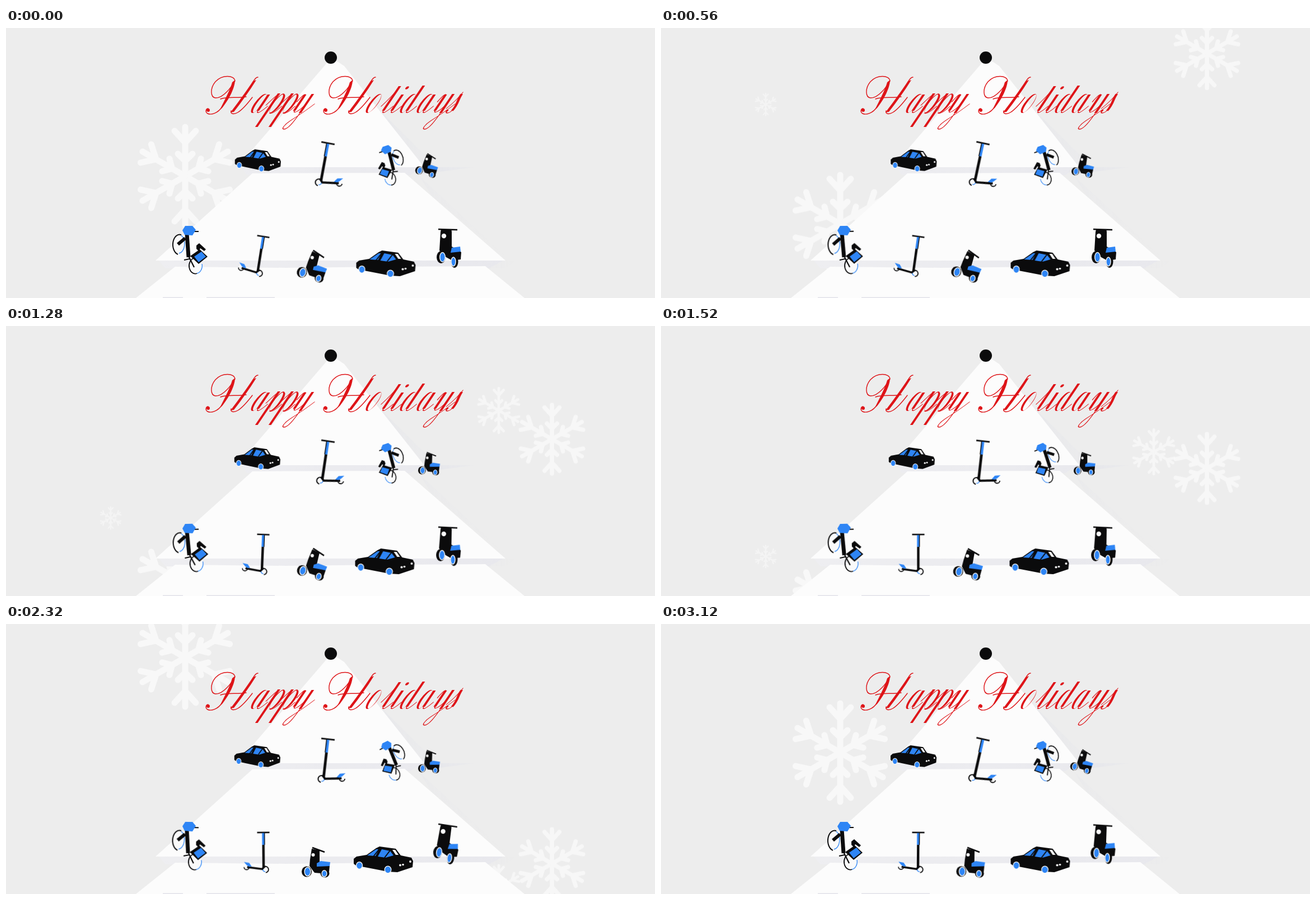
An HTML page for the animation above (3200 ms loop, 1159 by 483 pixels).

```html
<!DOCTYPE html>
<html lang="en">
<head>
<meta charset="utf-8">
<title>Happy Holidays</title>
<style>
  html, body { margin: 0; width: 100%; height: 100%; overflow: hidden; background: #ededed; }
  svg { display: block; width: 100%; height: 100%; }
  .ink { fill: #0b0b0c; }
  .blue { fill: #2e85f5; }
  .pale { fill: #fafafa; }
  .snowy { fill: #fcfcfc; }
  .line { fill: none; stroke: #0b0b0c; }
  .bline { fill: none; stroke: #2e85f5; }
  .hair { fill: none; stroke: #de1418; stroke-width: 1.4; stroke-linecap: round; }
  .stem { fill: none; stroke: #de1418; stroke-width: 4.6; }
  .red { fill: #de1418; }
  .flake { fill: none; stroke: #fafafa; stroke-linecap: round; }
</style>
</head>
<body>
<svg viewBox="0 0 1159 483" preserveAspectRatio="none">
  <defs>
    <linearGradient id="shade" x1="0" x2="1">
      <stop offset="0" stop-color="#eeeef1"/>
      <stop offset="1" stop-color="#e8e8ed"/>
    </linearGradient>
    <linearGradient id="cast" x1="0" x2="1">
      <stop offset="0" stop-color="#e2e3ea"/>
      <stop offset="1" stop-color="#ebebee" stop-opacity="0"/>
    </linearGradient>

    <g id="car">
      <path class="ink" d="M1 22L6 18L24 15L41 3L47 0L76 4L85 16L104 20L107 26L106 37L79 46L62 45L5 34L1 31Z"/>
      <path class="blue" d="M25 16L41 5L46 5L40 17ZM44 18L51 5L66 8L72 16L58 20Z"/>
      <path class="pale" d="M70 6L75 6L81 15L76 15Z"/>
      <path class="line" stroke-width="2" d="M36 18L47 4M56 20L66 7"/>
      <g class="blue" stroke="#fafafa" stroke-width="1.3">
        <ellipse cx="11" cy="34" rx="5.5" ry="6.3"/>
        <ellipse cx="62" cy="41.5" rx="5.8" ry="6.3"/>
      </g>
      <g class="pale">
        <circle cx="84" cy="33.5" r="2"/><circle cx="89" cy="32.5" r="1.8"/><circle cx="102" cy="27" r="1.9"/>
      </g>
    </g>

    <g id="kick">
      <path class="line" stroke-width="2.8" d="M-12 0H12"/>
      <path class="bline" stroke-width="5" d="M0 1V24"/>
      <path class="line" stroke-width="1.5" d="M-2.4 1V24"/>
      <path class="line" stroke-width="4.8" d="M0 24V68"/>
      <circle class="pale" cx="-4" cy="72" r="6"/>
      <path class="line" stroke-width="2" d="M-3 66A6 6 0 0 0 -4 78"/>
      <path class="bline" stroke-width="1.6" d="M-2 68A4 4 0 0 1 -3 76"/>
      <circle class="pale" cx="33" cy="66.5" r="5.5"/>
      <path class="line" stroke-width="1.8" d="M28 67A5 5 0 0 0 38 67"/>
      <path class="line" stroke-width="3.8" d="M-3 65L3 71L32 67"/>
      <path class="blue" d="M23 66L28 59L38 57L33 63L29 66Z"/>
    </g>

    <g id="bike">
      <ellipse class="pale" cx="-18" cy="25" rx="11" ry="17"/>
      <path class="line" stroke-width="2" d="M-13 8A12 18 0 0 0 -19 43"/>
      <path class="bline" stroke-width="1.3" d="M-13 9A11 17 0 0 1 -17 41"/>
      <ellipse class="pale" cx="14" cy="63" rx="10" ry="13"/>
      <path class="line" stroke-width="1.8" d="M9 50A11 14 0 0 0 15 77"/>
      <path class="bline" stroke-width="1.3" d="M15 77A11 14 0 0 0 24 60"/>
      <path class="line" stroke-width="6" d="M-19 25L-6 14"/>
      <path class="line" stroke-width="7" d="M-3 6L0 48"/>
      <path class="line" stroke-width="2.2" d="M-8 53L2 51M0 46L10 66M8 2H18"/>
      <path class="ink" d="M14 27L19 23L31 34L28 37L21 32L18 37L14 33ZM3 46L20 34L34 47L18 60Z"/>
      <path class="blue" d="M10 47L23 38L31 47L18 57Z"/>
      <path class="blue" d="M-11 0L-6 -8H7L13 -1L7 9L-7 8Z"/>
    </g>

    <g id="moped">
      <ellipse class="ink" cx="12.5" cy="41" rx="8" ry="7.5"/>
      <ellipse class="ink" cx="-20" cy="38" rx="9" ry="9.5"/>
      <path class="ink" d="M-11 -3L3 0L3 22L21 27L20 38L6 41L-6 40L-15 28L-14 16Z"/>
      <path class="line" stroke-width="2.4" d="M-10 -5L12 3"/>
      <circle class="pale" cx="-8.5" cy="8" r="3"/>
      <path class="blue" d="M-2 23L5 19L22 21L21 28L-2 29Z"/>
      <g class="blue" stroke="#fafafa" stroke-width="1.4">
        <ellipse cx="-18.5" cy="38" rx="5.4" ry="7.8"/>
        <ellipse cx="11.5" cy="41.5" rx="4.4" ry="5.8"/>
      </g>
    </g>

    <g id="tall">
      <ellipse class="ink" cx="12" cy="58" rx="6.5" ry="11"/>
      <ellipse class="ink" cx="-12" cy="50" rx="8" ry="11"/>
      <path class="ink" d="M-12 0L5 0Q7 1 7 5L7 31L24 41L23 54L8 56L-3 50L-15 38L-13 5Z"/>
      <path class="line" stroke-width="2.6" d="M-17 0L17 1"/>
      <circle class="pale" cx="-7" cy="12" r="4.2"/>
      <path class="blue" d="M7 33L22 31L23 40L5 42Z"/>
      <g class="blue" stroke="#fafafa" stroke-width="1.4">
        <ellipse cx="-9.5" cy="50" rx="4.8" ry="8.5"/>
        <ellipse cx="10" cy="58" rx="4" ry="8"/>
      </g>
    </g>

    <g id="H">
      <path class="hair" d="M409 95C408 84 386 83 374 96C364 108 365 124 374 125C388 126 404 104 408 95M386 141C378 153 366 156 360 153C356 151 356 145 361 144M383 127C396 122 412 126 429 123M441 97C444 91 447 88 450 88M402 148C400 154 407 155 414 151C424 145 433 133 440 124"/>
      <path class="red" d="M409 93C409 106 399 127 386 143L382 146C391 128 400 111 404 97ZM441 95L447 93C434 114 420 133 407 150L401 151C415 132 430 112 441 95Z"/>
      <circle class="red" cx="361" cy="147" r="3"/>
    </g>
    <path id="bowl" class="red" fill-rule="evenodd" d="M0 -17a8 17 0 1 1 16 0a8 17 0 1 1 -16 0M4.2 -17a5.4 16 0 1 0 10.8 0a5.4 16 0 1 0 -10.8 0"/>
    <path id="foot" class="hair" d="M0 -6C0 2 5 2 12 -12"/>
    <g id="a"><use href="#bowl"/><path class="stem" d="M15 -33V-4"/><use href="#foot" x="15"/></g>
    <use id="o" href="#bowl"/>
    <g id="l"><path class="stem" d="M0 -48V-4"/><use href="#foot"/><path class="hair" d="M-9 -12C-4 -24 -1 -34 0 -46"/></g>
    <g id="i"><path class="stem" d="M0 -33V-4"/><use href="#foot"/><circle class="red" cy="-45" r="2.7"/></g>
    <g id="d"><use href="#bowl"/><path class="stem" d="M15 -49V-4"/><use href="#foot" x="15"/></g>
    <g id="p"><path class="hair" d="M-9 -14C-4 -28 -2 -32 0 -34M0 -12C2 -30 6 -35 9 -34M7 0C12 2 16 -2 20 -12"/><path class="stem" d="M0 -35V25"/><use href="#bowl" transform="translate(17) scale(-1 1)"/></g>
    <g id="y"><path class="hair" d="M-6 -20C-4 -30 -2 -34 0 -33M0 -6C0 2 8 0 13 -16M13 -4C13 16 11 29 4 29C-2 29 0 20 5 14C13 5 20 -3 28 -16"/><path class="stem" d="M0 -33V-4M13 -34V0"/></g>
    <g id="s"><path class="hair" d="M-4 -8C2 -18 5 -28 6 -37M9 -5C6 2 0 1 -1 -4"/><path class="stem" d="M6 -34C5 -24 12 -16 9 -4"/><circle class="red" cy="-4" r="2"/></g>
  </defs>

  <rect width="1159" height="483" fill="#ededed"/>
  <g id="snow"></g>

  <g id="tree">
    <path fill="url(#cast)" opacity=".4" d="M665 145L770 249L735 262L900 416L760 300Z"/>
    <path fill="url(#cast)" d="M730 249H835L740 262ZM850 416H912L890 430H850Z"/>
    <path fill="url(#shade)" d="M420 248H745L722 263H430ZM272 415H890L862 430H285Z"/>
    <path class="snowy" d="M577 58H589L604 68L747 249H413ZM440 260L712 259L892 416H267ZM302 427L500 429L690 427L856 426L926 483H232Z"/>
    <path fill="#e2e2e9" d="M280 481.6H316V483H280ZM358 481.6H480V483H358Z"/>
  </g>

  <circle class="ink" cx="580" cy="53" r="11"/>

  <g aria-hidden="true">
    <use href="#H"/><use href="#H" x="210"/>
    <g id="script" transform="translate(0 152) skewX(-34)"></g>
  </g>
  <text x="360" y="152" font-family="Liberation Serif, serif" font-style="italic" font-size="72" fill="transparent">Happy Holidays</text>

  <g id="rides"></g>
</svg>
<script>
const LOOP = 3200, TICK = 80;
const marks = [0, 560, 1040, 1520, 2320, 2720, 3120, LOOP];
const $ = id => document.getElementById(id);

function add(parent, tag, attrs) {
  const el = document.createElementNS('http://www.w3.org/2000/svg', tag);
  for (const k in attrs) el.setAttribute(k, attrs[k]);
  return parent.appendChild(el);
}

// Moves through the poses in whole ticks of 80 ms.
function play(el, times, poses) {
  const frames = times.map((t, k) => ({
    offset: t / LOOP,
    transform: poses[k],
    easing: k + 1 < times.length ? `steps(${(times[k + 1] - t) / TICK}, end)` : 'linear'
  }));
  el.animate(frames, { duration: LOOP, iterations: Infinity });
}

// Lowercase script letters and where each sits on the baseline.
[['a', 432], ['p', 464], ['p', 488], ['y', 512],
 ['o', 637], ['l', 671], ['i', 686], ['d', 698], ['a', 728], ['y', 763], ['s', 785]]
  .forEach(([ch, x]) => add($('script'), 'use', { href: '#' + ch, x }));

// Snowflakes: x, start y, px per ms, radius, opacity.
const arm = 'M0 0V-88M-19 -81L0 -60L19 -81M-13 -40L0 -27L13 -40';
[[320, 265, .153, 93, .8], [320, -433, .2125, 93, .8], [975, -76, .2175, 65, .75],
 [187, -24, .287, 21, .55], [880, -243, .308, 42, .65]]
  .forEach(([x, y, v, r, opacity]) => {
    const g = add($('snow'), 'g', { class: 'flake', opacity });
    const size = add(g, 'g', { transform: `scale(${r / 93})`, 'stroke-width': 11 });
    for (let a = 0; a < 360; a += 60) add(size, 'path', { d: arm, transform: `rotate(${a})` });
    play(g, [0, LOOP], [0, LOOP].map(t => `translate(${x}px, ${y + v * t}px)`));
  });

// Hanging rides: shape, pivot, scale, then the swing in degrees (cars: slide in px) at each mark.
[['car', 408, 217, .775, .84, [0, 1.5, 0, -2, -1, 0, 1.2]],
 ['car', 624.5, 398, 1, 1, [0, -1, -1, -3, -4.5, -3, -1]],
 ['kick', 575, 206, 1, 1, [10.5, 12, 10.5, 6.5, 6.5, 6.5, 12.7]],
 ['kick', 459.5, 373, -.92, .92, [9, 8, 4.5, 0, -.5, .5, .5]],
 ['bike', 326, 362, 1, 1, [0, -1, -1.5, -1.5, 1, -3, 0]],
 ['bike', 680, 217, -.82, .82, [-18, -19, -15, -22, -26, -23, -19]],
 ['moped', 759, 230, .76, .76, [13, 8, 4, 0, 2, 8, 13]],
 ['moped', 557, 405, 1, 1, [14, 16, 17, 10, 0, -1, 1]],
 ['tall', 789, 360, 1, 1, [0, 0, 1, 1, 7, 8, 2]]]
  .forEach(([shape, x, y, sx, sy, swing]) => {
    const el = add($('rides'), 'use', { href: '#' + shape });
    const poses = [...swing, swing[6]].map(v => shape === 'car'
      ? `translate(${x + v}px, ${y}px) scale(${sx}, ${sy})`
      : `translate(${x}px, ${y}px) rotate(${v}deg) scale(${sx}, ${sy})`);
    play(el, marks, poses);
  });
</script>
</body>
</html>
```
